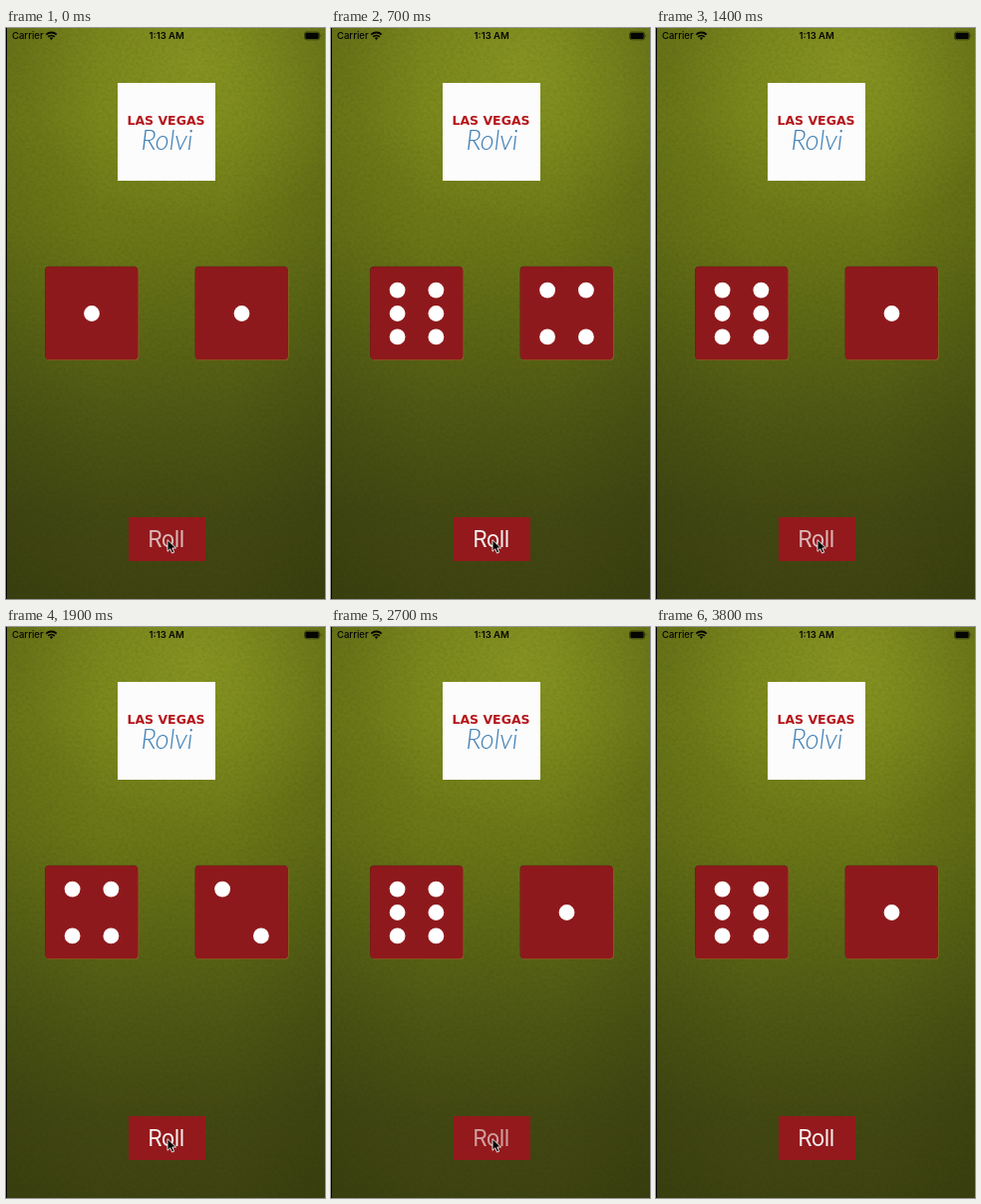
These frames come from a looping animation (320 px wide and 572 px high, 3900 ms). An HTML page:

```html
<!DOCTYPE html>
<html lang="en">
<head>
<meta charset="utf-8">
<title>Dice roll</title>
<style>
  html, body { margin: 0; width: 100%; height: 100%; overflow: hidden; background: #3c4110; }
  svg { display: block; width: 320px; height: 572px; }
  .status { font: 500 9.5px Inter, sans-serif; fill: #050602; }
  .status .time { font-weight: 600; }
  .sign { font: bold 12.5px "DejaVu Sans", sans-serif; fill: #b5161b; }
  .name { font: italic 300 27px Lato, sans-serif; fill: #3f7fb5; }
  .roll { font: 400 22.6px Inter, sans-serif; letter-spacing: -.6px; fill: #f6efee; }
</style>
</head>
<body>
<svg viewBox="0 0 320 572">
  <defs>
    <linearGradient id="felt" x2="0" y2="1">
      <stop offset="0" stop-color="#727e1a"/>
      <stop offset=".16" stop-color="#75821a"/>
      <stop offset=".36" stop-color="#6c7817"/>
      <stop offset=".52" stop-color="#5d6815"/>
      <stop offset=".7" stop-color="#4d5614"/>
      <stop offset=".85" stop-color="#434912"/>
      <stop offset="1" stop-color="#3e4311"/>
    </linearGradient>
    <radialGradient id="glow" gradientUnits="userSpaceOnUse" cx="190" cy="35" r="170">
      <stop offset="0" stop-color="#a0b02c" stop-opacity=".42"/>
      <stop offset=".5" stop-color="#a0b02c" stop-opacity=".2"/>
      <stop offset="1" stop-color="#a0b02c" stop-opacity="0"/>
    </radialGradient>
    <linearGradient id="shade">
      <stop offset="0" stop-color="#20250a" stop-opacity=".14"/>
      <stop offset=".3" stop-color="#20250a" stop-opacity="0"/>
      <stop offset=".7" stop-color="#20250a" stop-opacity="0"/>
      <stop offset="1" stop-color="#20250a" stop-opacity=".16"/>
    </linearGradient>
    <filter id="grain" x="0" y="0" width="1" height="1" color-interpolation-filters="sRGB">
      <feTurbulence type="fractalNoise" baseFrequency=".3 .34" numOctaves="2" seed="7"/>
      <feColorMatrix values="0 0 0 0 .1  0 0 0 0 .12  0 0 0 0 .02  .9 0 0 0 -.32"/>
    </filter>
  </defs>

  <rect width="320" height="572" fill="url(#felt)"/>
  <rect width="320" height="572" fill="url(#shade)"/>
  <rect width="320" height="572" fill="url(#glow)"/>
  <rect width="320" height="572" filter="url(#grain)" opacity=".2"/>
  <rect width="1" height="572" fill="#000"/>

  <g class="status">
    <text x="6" y="11.4">Carrier</text>
    <text class="time" x="161.2" y="11.4" text-anchor="middle">1:13 AM</text>
  </g>
  <g fill="none" stroke="#050602" stroke-width="1.8">
    <path d="M40.3 6.7a7.3 7.3 0 0 1 10.4 0M42.2 8.9a4.7 4.7 0 0 1 6.6 0"/>
    <path d="M45.5 12l-1.7-1.9a2.4 2.4 0 0 1 3.4 0z" fill="#050602" stroke="none"/>
  </g>
  <rect x="299.5" y="4" width="15" height="7.8" rx="2" fill="none" stroke="#2a300a" stroke-width=".7"/>
  <rect x="300.3" y="4.8" width="13.4" height="6.2" rx="1.2" fill="#050602"/>
  <path d="M315.5 6.6q1.4 1.3 0 2.6z" fill="#2a300a"/>

  <rect x="112" y="55" width="98" height="98" fill="#fcfcfc"/>
  <g text-anchor="middle">
    <text class="sign" x="160.5" y="97">LAS VEGAS</text>
    <text class="name" x="161.5" y="122">Rolvi</text>
  </g>

  <g id="dice"></g>

  <rect x="123" y="490" width="77" height="44" fill="#93191c"/>
  <text id="label" class="roll" x="160.4" y="520.3" text-anchor="middle">Roll</text>
  <path id="cursor" d="M162 512.7v11.6l2.7-2.5 1.9 4.3 2.1-.9-1.9-4.2h3.7z"
    fill="#000" stroke="#fff" stroke-width=".9" stroke-linejoin="round"/>
</svg>

<script>
const LOOP = 3900;
const HIDE_CURSOR = 3500;

// Button presses: time in ms, then the faces that come up
const rolls = [
  [-50, 6, 4],
  [700, 6, 1],
  [1350, 4, 2],
  [1950, 6, 4],
  [2450, 6, 1]
];
const RELEASE = 200;
const firstFace = 1;

// Pip positions on a 3 by 3 grid and the faces that use them
const pips = [
  [0, 0, n => n % 2],
  [-1, -1, n => n > 1],
  [1, 1, n => n > 1],
  [1, -1, n => n > 3],
  [-1, 1, n => n > 3],
  [-1, 0, n => n === 6],
  [1, 0, n => n === 6]
];

const dice = document.getElementById('dice');

function add(tag, attrs) {
  const el = document.createElementNS('http://www.w3.org/2000/svg', tag);
  for (const key in attrs) el.setAttribute(key, attrs[key]);
  return dice.appendChild(el);
}

function addSquare(cx, shift, fill) {
  add('rect', { x: cx - 46.5 + shift, y: 239.3 + shift, width: 93, height: 93, rx: 4, fill });
}

// Loops an opacity track of [ms, value] pairs
function play(el, track, easing) {
  const frames = track.map(([ms, opacity]) => ({ offset: ms / LOOP, opacity, easing }));
  frames.push({ offset: 1, opacity: track[0][1] });
  el.animate(frames, { duration: LOOP, iterations: Infinity });
}

const hold = (el, track) => play(el, track, 'steps(1, end)');

[86, 236.5].forEach((cx, die) => {
  // Lit lower edge, dark upper edge, then the face
  addSquare(cx, .8, '#85651f');
  addSquare(cx, -.5, '#5c2413');
  addSquare(cx, 0, '#8e191c');

  const faces = [[0, firstFace], ...rolls.map(r => [r[0] + RELEASE, r[die + 1]])];
  for (const [dx, dy, shown] of pips) {
    const pip = add('circle', { cx: cx + dx * 19.4, cy: 286 + dy * 23.4, r: 7.9, fill: '#fff' });
    hold(pip, faces.map(([ms, n]) => [ms, shown(n) ? 1 : 0]));
  }
});

// The label dims under the press and recovers after the release
const fade = [[0, 1], [50, .75], [100, .4], [RELEASE, .5], [400, 1]];
const dim = rolls.flatMap(([at]) => fade.map(([ms, v]) => [at + ms, v])).filter(([ms]) => ms >= 0);
play(document.getElementById('label'), [...dim, [LOOP - 50, 1]], 'linear');

hold(document.getElementById('cursor'), [[0, 1], [HIDE_CURSOR, 0]]);
</script>
</body>
</html>
```
